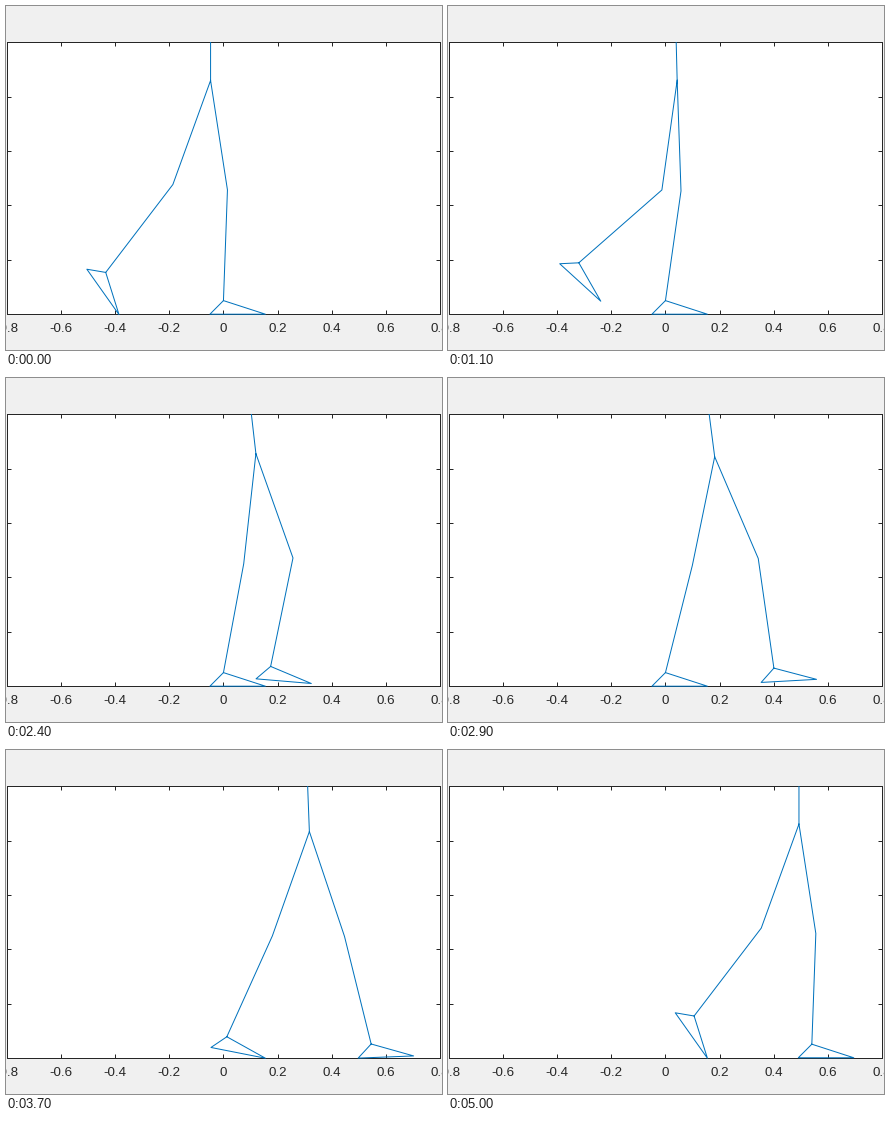
These frames come from a looping animation (436x344 px, 5.1 s). A matplotlib script:

```python
import numpy as np
import matplotlib.pyplot as plt
from matplotlib.animation import FuncAnimation
from matplotlib.transforms import Bbox

W, H, DPI = 436, 344, 100
FRAMES, INTERVAL = 51, 100
PX = 72 / DPI                       # one pixel in points
INK, BLUE = "#262626", "#0072BD"

# Axes edges in pixels from the top left corner
LEFT, RIGHT, TOP, BOTTOM = 0.95, 433.95, 36.4, 308.2

# One step is half of a leg's cycle, in seconds
STEP, CYCLE = 5.0, 10.0

# Lengths in axis units; points are complex numbers
LIMB, TRUNK = 0.4075, 0.4
HEEL, TOE = -0.05 - 0.05j, 0.155 - 0.05j
PLANTED_TOE = 0.155


def through(points, period, ease=False):
    """Periodic curve through (second, degree) points.

    With ease=True it comes to rest at every point.
    """
    t, v = np.array(points + [(points[0][0] + period, points[0][1])]).T
    dt = np.diff(t)
    slope = np.diff(v) / dt
    before, dt_before = np.roll(slope, 1), np.roll(dt, 1)
    tangent = (dt * before + dt_before * slope) / (dt + dt_before)
    tangent = np.append(tangent, tangent[0]) * (not ease)

    def curve(time):
        time = t[0] + (time - t[0]) % period
        i = np.searchsorted(t, time, side="right") - 1
        u = (time - t[i]) / dt[i]
        degrees = ((1 + 2 * u) * (1 - u) ** 2 * v[i]
                   + u * (1 - u) ** 2 * dt[i] * tangent[i]
                   + u * u * (3 - 2 * u) * v[i + 1]
                   + u * u * (u - 1) * dt[i] * tangent[i + 1])
        return np.radians(degrees)

    return curve


def thigh(time):
    w = 2 * np.pi * time / CYCLE
    return np.radians(-0.4 - 15 * np.cos(w) + 12.7 * np.sin(w)
                      - 6.2 * np.cos(2 * w) - 0.5 * np.sin(2 * w)
                      + 0.6 * np.cos(3 * w) - 1.4 * np.sin(3 * w)
                      + np.cos(4 * w))


shank = through([(0, -37.5), (0.7, -51.2), (2.1, -22), (3.3, 17),
                 (4.2, 5.2), (5.6, -6.1), (7.8, -13.2), (9.2, -30.5)], CYCLE)
foot = through([(0.2, 56), (3.1, -4), (4.4, 0), (8.1, 0)], CYCLE, ease=True)
lean = through([(0, 0), (1.2, 1.5), (2.8, 7.5), (4.2, 0)], STEP, ease=True)


def limb(angle):
    return -1j * LIMB * np.exp(1j * angle)


def leg(hip, time):
    knee = hip + limb(thigh(time))
    ankle = knee + limb(shank(time))
    turn = np.exp(-1j * foot(time))
    return [hip, knee, ankle, ankle + HEEL * turn, ankle + TOE * turn, ankle]


def pose(time):
    """Stand on the planted toe, build up to the hip, hang the other leg."""
    stance = time + STEP
    ankle = PLANTED_TOE - TOE * np.exp(-1j * foot(stance))
    hip = ankle - limb(shank(stance)) - limb(thigh(stance))
    head = hip + 1j * TRUNK * np.exp(1j * lean(time))
    gap = complex(np.nan, np.nan)
    return np.array([head] + leg(hip, stance) + [gap] + leg(hip, time))


plt.rcParams["font.family"] = "Liberation Sans"
fig = plt.figure(figsize=(W / DPI, H / DPI), dpi=DPI, facecolor="#f0f0f0")
ax = fig.add_axes([LEFT / W, 1 - BOTTOM / H,
                   (RIGHT - LEFT) / W, (BOTTOM - TOP) / H])
ax.set(xlim=(-0.8, 0.8), ylim=(0, 1))
ticks = np.arange(-4, 5) / 5
ax.set_xticks(ticks, [f"{x:g}" for x in ticks])
ax.set_yticks(np.arange(6) / 5, [""] * 6)
ax.tick_params(direction="in", top=True, right=True, length=4.3 * PX,
               width=PX, pad=9 * PX, color=INK, labelcolor=INK,
               labelsize=13.33 * PX)
for spine in ax.spines.values():
    spine.set(linewidth=PX, color=INK)

# The walker may cover the frame line but not go past it
walker, = ax.plot([], [], color=BLUE, lw=PX, zorder=3)
walker.set_clip_box(Bbox.from_extents(1, H - 309, 435, H - 36))


def draw(frame):
    points = pose(frame * INTERVAL / 1000)
    walker.set_data(points.real, points.imag)
    return walker,


anim = FuncAnimation(fig, draw, frames=FRAMES, interval=INTERVAL,
                     repeat=True, repeat_delay=0)
plt.show()
```
